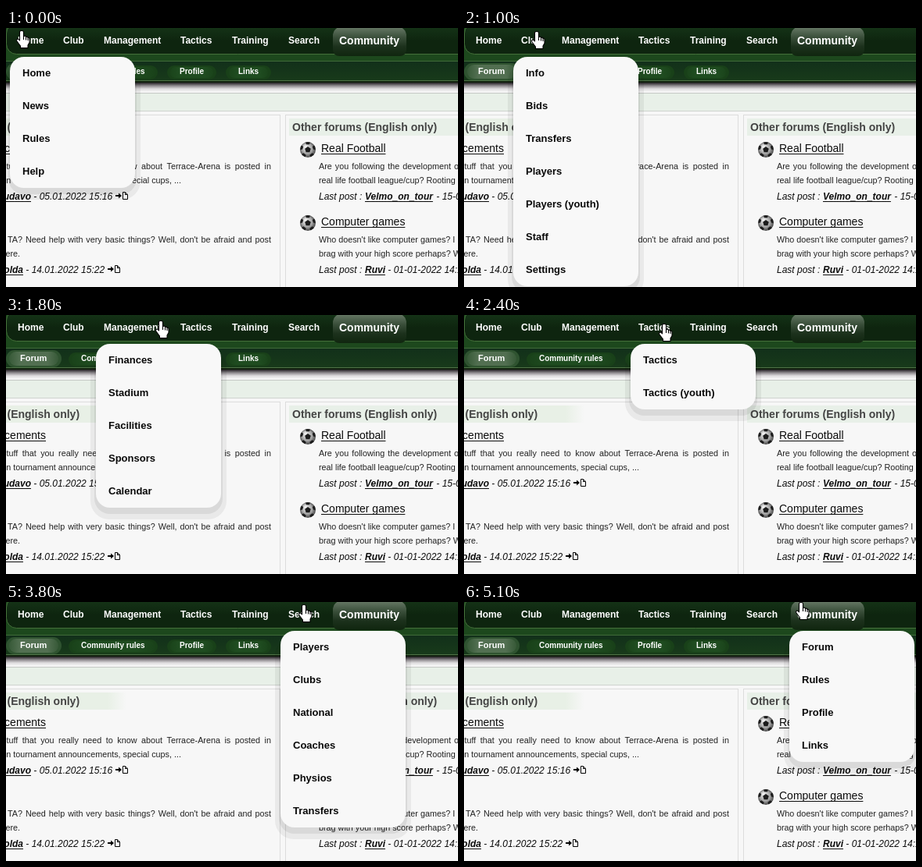
These frames come from a looping animation (578x332 px, 5200 ms). An HTML page with a canvas:

```html
<!DOCTYPE html>
<html lang="en">
<head>
<meta charset="utf-8">
<title>Dropdown menus</title>
<style>
html, body { margin: 0; width: 100%; height: 100%; overflow: hidden; background: #f7f7f7; }
canvas { display: block; }
</style>
</head>
<body>
<canvas id="stage" width="578" height="332"></canvas>
<script>
const W = 578, H = 332, LOOP = 5200, STEP = 100;
const FONT = '"Liberation Sans", Arial, sans-serif';
const ctx = document.getElementById('stage').getContext('2d');

const tabs = [
  { x: 15, name: 'Home', items: ['Home', 'News', 'Rules', 'Help'] },
  { x: 73, name: 'Club', items: ['Info', 'Bids', 'Transfers', 'Players', 'Players (youth)', 'Staff', 'Settings'] },
  { x: 125, name: 'Management', items: ['Finances', 'Stadium', 'Facilities', 'Sponsors', 'Calendar'] },
  { x: 223, name: 'Tactics', items: ['Tactics', 'Tactics (youth)'] },
  { x: 289, name: 'Training', items: ['Training', 'Physios', 'Physio Report'] },
  { x: 361, name: 'Search', items: ['Players', 'Clubs', 'National', 'Coaches', 'Physios', 'Transfers'] },
  { x: 426, name: 'Community', items: ['Forum', 'Rules', 'Profile', 'Links'] }
];

// Fingertip path: time, x, y
const path = [
  [0, 20, 3], [100, 24, 5], [300, 24, 5], [400, 76, 6], [700, 76, 6], [1000, 93, 4],
  [1100, 108, 4], [1300, 143, 4], [1500, 152, 6], [1600, 152, 6], [1700, 172, 7],
  [1800, 198, 7], [1900, 215, 8], [2200, 240, 9], [2400, 256, 11], [2500, 256, 11],
  [2600, 279, 12], [2900, 294, 13], [3000, 294, 13], [3100, 296, 11], [3200, 296, 11],
  [3300, 299, 15], [3400, 299, 15], [3600, 352, 8], [3800, 381, 3], [4000, 396, 4],
  [4300, 442, 12], [4500, 442, 12], [4600, 451, 19], [5100, 431, 0]
];

function tipAt(t) {
  t = Math.floor(t / STEP) * STEP;
  let i = 0;
  while (i < path.length - 2 && path[i + 1][0] <= t) i++;
  const [t0, x0, y0] = path[i], [t1, x1, y1] = path[i + 1];
  const k = Math.min(1, (t - t0) / (t1 - t0));
  return [Math.round(x0 + (x1 - x0) * k), Math.round(y0 + (y1 - y0) * k)];
}

function fill(x, y, w, h, color) {
  ctx.fillStyle = color;
  ctx.fillRect(x, y, w, h);
}

function blend(x0, y0, x1, y1, ...stops) {
  const g = ctx.createLinearGradient(x0, y0, x1, y1);
  stops.forEach((c, i) => g.addColorStop(i / (stops.length - 1), c));
  return g;
}

function box(x, y, w, h, r, color) {
  ctx.beginPath();
  ctx.roundRect(x, y, w, h, r);
  ctx.fillStyle = color;
  ctx.fill();
}

function text(s, x, y, style, color, align = 'left') {
  ctx.font = style + ' ' + FONT;
  ctx.fillStyle = color;
  ctx.textAlign = align;
  ctx.fillText(s, x, y);
  return ctx.measureText(s).width;
}

function link(s, x, y, style, align = 'left') {
  const w = text(s, x, y, style, INK, align);
  fill(align === 'right' ? x - w : x, y + 2, w, 1, INK);
}

const INK = '#0c0c0c', BODY_INK = '#222';
const TITLE = '14px', BODY = '10.8px', META = 'italic 12px', USER = 'italic bold 12px';

function justify(s, x0, x1, y) {
  ctx.font = BODY + ' ' + FONT;
  const words = s.split(' ');
  const used = words.reduce((sum, w) => sum + ctx.measureText(w).width, 0);
  const gap = (x1 - x0 - used) / (words.length - 1);
  for (const w of words) x0 += text(w, x0, y, BODY, BODY_INK) + gap;
}

// Pill with a soft glow that fades towards its ends
function pill(x, y, w, h, glow, edge) {
  box(x, y, w, h, h / 2, edge);
  box(x + 4, y + 2, w - 8, h - 4, h / 2 - 2, blend(x, 0, x + w, 0, edge, glow, glow, glow, edge));
}

function header() {
  fill(0, 0, W, 68, '#1d481d');
  ctx.beginPath();
  ctx.roundRect(0.5, -6, W + 30, 39.5, 13);
  ctx.fillStyle = blend(0, 0, 0, 33, '#143216', '#0e250f', '#0e250f');
  ctx.fill();
  ctx.strokeStyle = '#44703a';
  ctx.lineWidth = 1;
  ctx.stroke();
  fill(0, 42, W, 1, '#3f6a38');
  fill(0, 43, W, 24, blend(0, 43, 0, 67, '#12301a', '#183a1a'));
  fill(0, 67, W, 1, '#4e7346');
  fill(0, 68, W, 2, '#12220f');
  fill(0, 70, W, 12, blend(0, 70, 0, 82, '#242024', '#8d898d', '#dedcde', '#f7f7f7'));

  box(418, -2, 94, 38, [12, 12, 8, 8], blend(0, 0, 0, 36, '#637562', '#3a4f3a', '#1c311c', '#10260f'));
  for (const tab of tabs) {
    const active = tab.name === 'Community';
    text(tab.name, tab.x, active ? 21 : 20, active ? 'bold 14px' : 'bold 12px', '#fff');
  }

  pill(0, 45, 71, 22, '#526f51', '#2f5330');
  text('Forum', 18, 59, 'bold 11px', '#fff');
  for (const [s, x, w] of [['Community rules', 80, 114], ['Profile', 206, 63], ['Links', 281, 58]]) {
    pill(x, 48, w, 18, '#1f4c20', '#194119');
    text(s, x + 16, 59, 'bold 10px', '#fff');
  }
}

function ball(x, y) {
  const g = ctx.createRadialGradient(x - 3, y - 4, 1, x, y, 10.5);
  g.addColorStop(0, '#eee');
  g.addColorStop(0.6, '#a5a5a5');
  g.addColorStop(1, '#3c3c3c');
  ctx.save();
  ctx.beginPath();
  ctx.arc(x, y, 10, 0, 7);
  ctx.fillStyle = g;
  ctx.fill();
  ctx.clip();
  const spot = (cx, cy, r) => {
    ctx.beginPath();
    for (let i = 0; i < 5; i++) {
      const a = i * Math.PI * 0.4 - Math.PI / 2;
      ctx.lineTo(cx + r * Math.cos(a), cy + r * Math.sin(a));
    }
    ctx.fillStyle = '#1c1c1c';
    ctx.fill();
  };
  spot(x, y, 4);
  for (let i = 0; i < 5; i++) {
    const a = i * Math.PI * 0.4 - Math.PI / 2;
    spot(x + 9.5 * Math.cos(a), y + 9.5 * Math.sin(a), 3.4);
  }
  ctx.restore();
}

function lastIcon(x, y) {
  fill(x, y - 1, 5, 2, '#000');
  ctx.beginPath();
  ctx.moveTo(x + 4, y - 3.5);
  ctx.lineTo(x + 8, y);
  ctx.lineTo(x + 4, y + 3.5);
  ctx.fill();
  ctx.beginPath();
  ctx.moveTo(x + 9.5, y - 4.5);
  ctx.lineTo(x + 12.5, y - 4.5);
  ctx.lineTo(x + 15.5, y - 1.5);
  ctx.lineTo(x + 15.5, y + 4.5);
  ctx.lineTo(x + 9.5, y + 4.5);
  ctx.closePath();
  ctx.fillStyle = '#fff';
  ctx.fill();
  ctx.strokeStyle = '#000';
  ctx.stroke();
  fill(x + 12, y - 4, 1, 3, '#000');
  fill(x + 12, y - 2, 3, 1, '#000');
}

function page() {
  fill(0, 0, W, H, '#f7f7f7');
  fill(0, 84, W, 22, '#e8f0e8');
  fill(0, 83, W, 1, '#c4c8c4');
  fill(0, 106, W, 1, '#cfd4cf');
  fill(0, 111, 351, 1, '#dcdcdc');
  fill(350, 111, 1, H, '#dcdcdc');
  fill(357, 111, W, 1, '#dcdcdc');
  fill(357, 111, 1, H, '#dcdcdc');

  fill(0, 116, 130, 22, '#e8f0e6');
  fill(130, 116, 24, 22, blend(130, 0, 154, 0, '#e8f0e6', '#f7f7f7'));
  fill(362, 116, W, 22, '#e8f0e8');
  text('(English only)', 1.5, 132, 'bold 14px', '#444');
  text('Other forums (English only)', 366, 132, 'bold 14px', '#444');

  link('cements', 51, 159, TITLE, 'right');
  justify('stuff that you really need to know about Terrace-Arena is posted in', -5, 339, 181);
  text('n tournament announcements, special cups, ...', 224, 199, BODY, BODY_INK, 'right');
  link('udavo', 32, 220, USER, 'right');
  text(' - 05.01.2022 15:16', 32, 220, META, INK);
  lastIcon(140, 215);

  justify("TA? Need help with very basic things? Well, don't be afraid and post", 2, 339, 275);
  text('here.', 18, 293, BODY, BODY_INK, 'right');
  link('olda', 22, 314, USER, 'right');
  text(' - 14.01.2022 15:22', 22, 314, META, INK);
  lastIcon(130, 309);

  ball(386, 156);
  link('Real Football', 403, 159, TITLE);
  justify('Are you following the development of', 400, 582, 181);
  text('real life football league/cup? Rooting', 400, 199, BODY, BODY_INK);
  text('Last post :', 400, 220, META, INK);
  link('Velmo_on_tour', 459, 220, USER);
  text(' - 15-01-2022', 547, 220, META, INK);

  ball(386, 250);
  link('Computer games', 403, 253, TITLE);
  text("Who doesn't like computer games? I", 400, 275, BODY, BODY_INK);
  text('brag with your high score perhaps? Why', 400, 293, BODY, BODY_INK);
  text('Last post :', 400, 314, META, INK);
  link('Ruvi', 459, 314, USER);
  text(' - 01-01-2022 14:10', 485, 314, META, INK);
}

function menu(tab) {
  const x = tab.x - 10, h = 42 * tab.items.length;
  // Stepped shadow, lowered below the panel
  box(x - 7, 45, 174, h + 7, 24, 'rgba(0,0,0,0.06)');
  box(x - 2, 44, 164, h + 1, 20, 'rgba(0,0,0,0.07)');
  box(x, 37, 160, h, 18, '#f8f8f8');
  tab.items.forEach((s, i) => text(s, x + 16, 62 + 42 * i, 'bold 13px', '#0a0a0a'));
}

const hand = new Path2D('M-2.5 13V2Q-2.5 .5 0 .5T2.5 2V7.5Q5 6.5 5.5 8.5Q7.5 7.5 8 9.5' +
  'Q10 9 10 11V15.5L8 19V22.5H-1.5V20L-6 14Q-7 11.5 -5 11Q-4 11 -2.5 13Z');
const knuckles = new Path2D('M2.5 7V12M5.5 8.5V12.5M8 9.5V13');

function cursor(x, y) {
  ctx.save();
  ctx.translate(x, y);
  ctx.fillStyle = '#fff';
  ctx.strokeStyle = '#000';
  ctx.lineWidth = 1.1;
  ctx.lineJoin = 'round';
  ctx.fill(hand);
  ctx.stroke(hand);
  ctx.stroke(knuckles);
  ctx.restore();
}

function draw(t) {
  const [x, y] = tipAt(t);
  page();
  header();
  menu(tabs.filter((tab, i) => !i || tab.x - 10 <= x).pop());
  cursor(x, y);
}

const start = performance.now();
function tick() {
  draw((performance.now() - start) % LOOP);
  requestAnimationFrame(tick);
}
tick();
</script>
</body>
</html>
```
